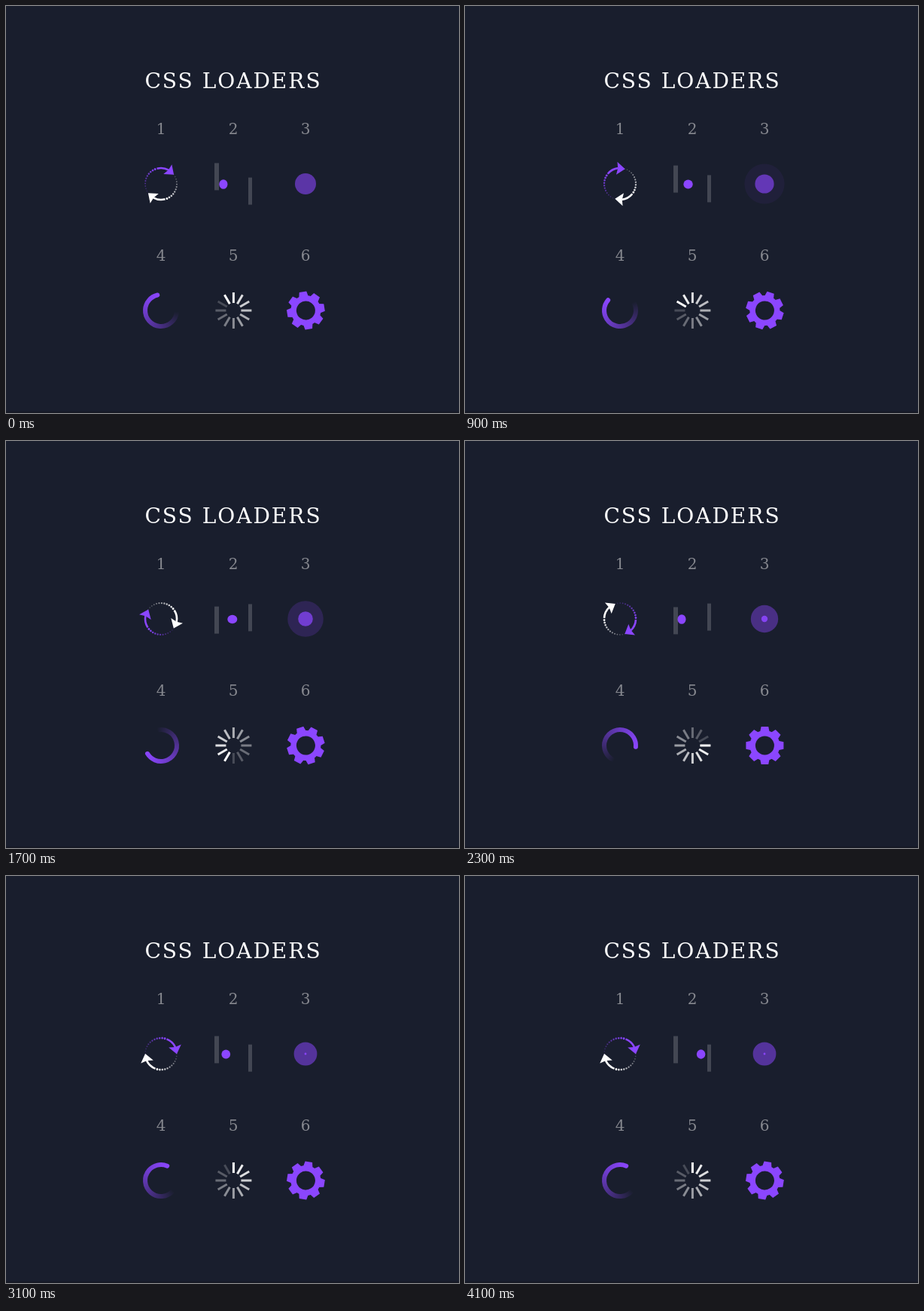
Animation, 602 px wide and 540 px high, one loop 4200 ms. Source, as an HTML page with a canvas:

```html
<!DOCTYPE html>
<html lang="en">
<head>
<meta charset="utf-8">
<title>CSS Loaders</title>
<style>
  html, body { margin: 0; height: 100%; overflow: hidden; background: #191e2d; }
  canvas { display: block; }
</style>
</head>
<body>
<canvas id="stage" width="602" height="540"></canvas>
<script>
const ctx = document.getElementById('stage').getContext('2d');
const LOOP = 4200, STEP = 100, TAU = Math.PI * 2;
const BG = '#191e2d', WHITE = '255,255,255', PURPLE = '139,70,255';
const rgba = (rgb, a) => `rgba(${rgb},${a})`;
const rad = deg => deg * Math.PI / 180;

// Runs draw() with the origin at x, y, turned clockwise by deg.
function at(x, y, deg, draw) {
  ctx.save();
  ctx.translate(x, y);
  ctx.rotate(rad(deg));
  draw();
  ctx.restore();
}

function disc(x, y, rx, ry = rx) {
  ctx.beginPath();
  ctx.ellipse(x, y, rx, ry, 0, 0, TAU);
  ctx.fill();
}

// Triangle wave from -1 at 0 to 1 at half a period.
function triangle(t, period) {
  const p = ((t / period) % 1 + 1) % 1;
  return 1 - 4 * Math.abs(p - 0.5);
}

function label(text, x, y, size, color, spacing = 0) {
  ctx.font = `${size}px "DejaVu Serif", serif`;
  ctx.letterSpacing = spacing + 'px';
  ctx.textAlign = 'center';
  ctx.fillStyle = color;
  ctx.fillText(text, x, y);
}

// Arrow head at the top of a circle, with a solid then dotted tail.
function arrow(rgb) {
  const R = 21, solid = 42, tail = 158;
  for (let a = solid + 7; a < tail; a += 9.5) {
    const k = 1 - (a - solid) / (tail - solid);
    ctx.fillStyle = rgba(rgb, 0.1 + 0.9 * k);
    disc(-R * Math.sin(rad(a)), -R * Math.cos(rad(a)), 0.7 + 0.8 * k);
  }
  ctx.strokeStyle = ctx.fillStyle = rgba(rgb, 1);
  ctx.lineWidth = 2.6;
  ctx.beginPath();
  ctx.arc(0, 0, R, rad(-90 - solid), rad(-88));
  ctx.stroke();
  at(0, -R, 14, () => {
    ctx.beginPath();
    ctx.moveTo(-1, -8.5);
    ctx.lineTo(10, 0);
    ctx.lineTo(-1, 8.5);
    ctx.lineTo(0.5, 0);
    ctx.fill();
  });
}

function arrows(t) {
  const turn = 27 + 360 * t;
  at(206, 236, turn, () => arrow(PURPLE));
  at(206, 236, turn + 180, () => arrow(WHITE));
}

function pong(t) {
  const shift = 10 * triangle(t + 0.01, 1);
  ctx.fillStyle = rgba(WHITE, 0.18);
  ctx.fillRect(277, 218 + shift, 6, 36);
  ctx.fillRect(322, 218 - shift, 5, 36);
  const x = triangle(t - 0.03, 0.75), squash = Math.abs(x);
  ctx.fillStyle = rgba(PURPLE, 1);
  disc(302.3 + 16 * x, 236.5, 6.6 - 1.2 * squash, 5.6 + 0.8 * squash);
}

function ripple(t) {
  for (const age of [t % 1 + 1, t % 1]) {
    ctx.fillStyle = rgba(PURPLE, 1 - (age / 2) ** 1.25);
    disc(398, 236, 14 * age);
  }
}

function comet(t) {
  const length = 262;
  at(206, 404, 356 + 360 * t, () => {
    const fade = ctx.createConicGradient(rad(-90), 0, 0);
    fade.addColorStop(0, rgba(PURPLE, 0));
    for (let a = length; a >= 0; a -= length / 8) {
      fade.addColorStop(1 - a / 360, rgba(PURPLE, 1 - (a / length) ** 1.3));
    }
    ctx.strokeStyle = fade;
    ctx.lineWidth = 6;
    ctx.lineCap = 'round';
    ctx.beginPath();
    ctx.arc(0, 0, 21, rad(-90 - length), rad(-99));
    ctx.stroke();
  });
}

function spokes(t) {
  const head = Math.floor(12 * t + 11.5);
  for (let i = 0; i < 12; i++) {
    at(302.4, 404, 30 * (head + i), () => {
      ctx.fillStyle = rgba(WHITE, 1 - 0.8 * i / 11);
      ctx.fillRect(-1.5, -24, 3, 14);
    });
  }
}

function gear(t) {
  at(398.4, 404, 180 * t - 9, () => {
    ctx.fillStyle = rgba(PURPLE, 1);
    disc(0, 0, 20);
    for (let i = 0; i < 8; i++) {
      ctx.rotate(TAU / 8);
      ctx.beginPath();
      ctx.moveTo(-6.3, -18);
      ctx.lineTo(-4.8, -25);
      ctx.lineTo(4.8, -25);
      ctx.lineTo(6.3, -18);
      ctx.fill();
    }
    ctx.fillStyle = BG;
    disc(0, 0, 12.5);
  });
}

function frame(now) {
  const t = Math.floor(now % LOOP / STEP) * STEP / 1000;
  ctx.fillStyle = BG;
  ctx.fillRect(0, 0, 602, 540);
  ctx.fillStyle = '#161925';
  ctx.fillRect(0, 538, 602, 2);
  label('CSS LOADERS', 302, 109, 28, '#fff', 2);
  [1, 2, 3, 4, 5, 6].forEach((n, i) => {
    const column = i < 3 ? i : 5 - i;
    const digit = i < 3 ? n : [4, 5, 6][5 - i];
    label(digit, 206 + 96 * column, i < 3 ? 170 : 338, 20, '#86888f');
  });
  for (const loader of [arrows, pong, ripple, comet, spokes, gear]) loader(t);
}

let start;
function tick(now) {
  start ??= now;
  frame(now - start);
  requestAnimationFrame(tick);
}
frame(0);
requestAnimationFrame(tick);
</script>
</body>
</html>
```
